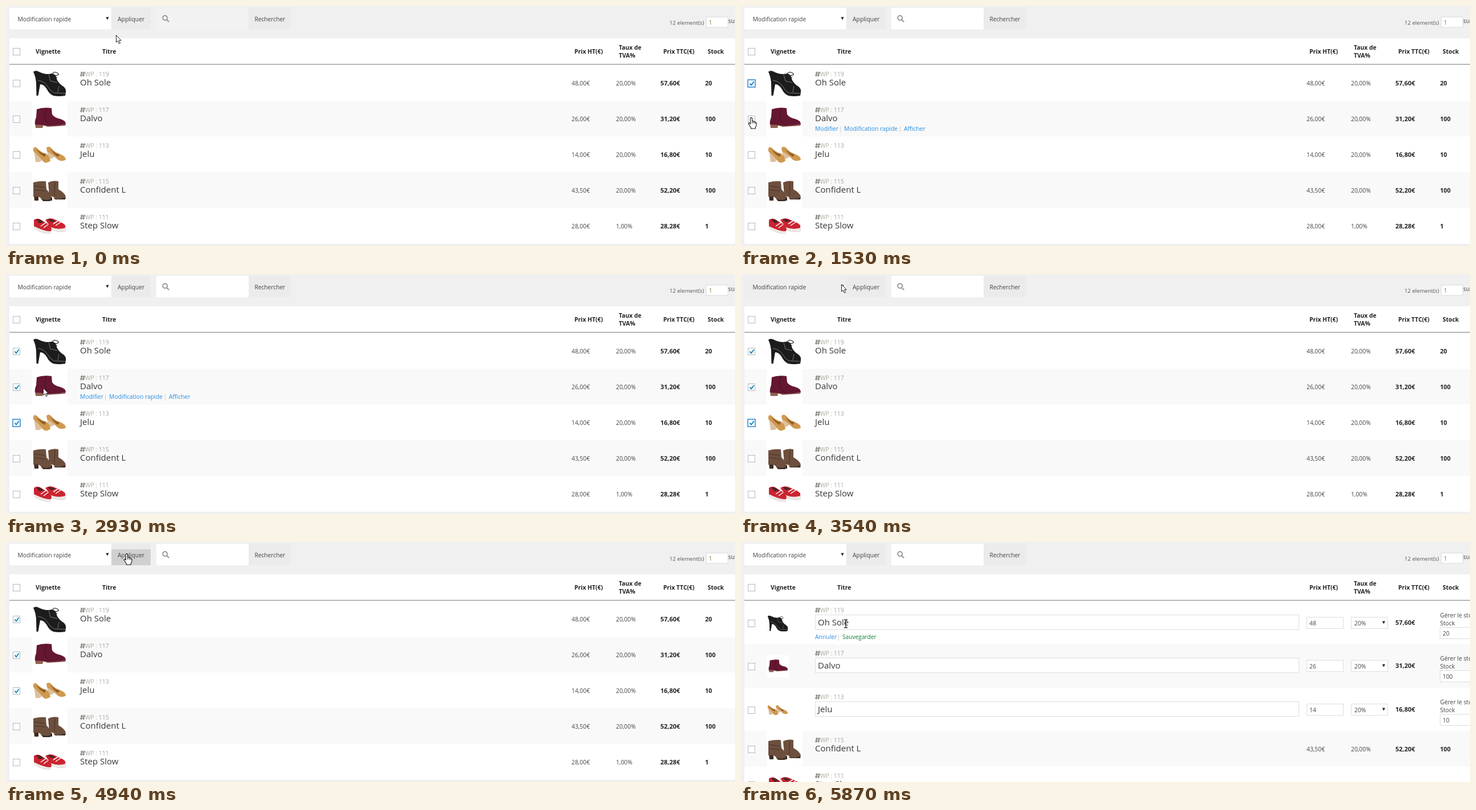
An HTML page that plays this animation: 1280x423 px, repeating every 6.42 s.

```html
<!DOCTYPE html>
<html lang="fr">
<head>
<meta charset="utf-8">
<title>Modification rapide</title>
<style>
  html, body { margin: 0; width: 100%; height: 100%; overflow: hidden; background: #f0f0f0; }
  svg { display: block; }
  text { font-family: "Open Sans", "Noto Sans", sans-serif; white-space: pre; }
</style>
</head>
<body>
<svg id="stage" width="1280" height="423" viewBox="0 0 1280 423">
  <defs>
    <g id="shoe0">
      <path fill="#1c1c1c" d="M3 12Q6 9 11 11Q20 16 29 16L37 15L42 18L45 27Q49 34 56 38Q61 42 60 48L59 54Q48 56 38 54Q31 51 27 43Q22 34 15 34L11.5 54H8.5L8 34Q8 23 3 12Z"/>
      <path fill="none" stroke="#777" d="M11 27Q22 28 29 39Q33 46 39 49L59 50M30 17L33 28L45 31M48 37L46 48"/>
      <path fill="none" stroke="#222" stroke-width="1.2" d="M36 17Q38 10 45 14T38 19M37 21L45 22"/>
    </g>
    <g id="shoe1">
      <path fill="#8f6252" d="M6 40L21 42L19 48H7ZM20 43L60 41L59 44L28 46Z"/>
      <path fill="#651631" d="M9 15Q20 11 35 13L36 24Q40 30 50 32Q60 35 60 41Q44 45 28 44Q15 42 6 42Q5 36 8 29Z"/>
      <path fill="none" stroke="#44102a" d="M25 13Q22 26 24 34Q30 41 32 43"/>
    </g>
    <g id="shoe2">
      <path fill="#dcc0a0" d="M4 23L7 45H14L25 37ZM27 25L29 39H35L43 34Z"/>
      <path fill="#d0994f" d="M3 21Q5 17 9 20Q16 28 25 30Q32 34 33 43Q27 48 21 45Q13 34 3 26ZM26 20Q30 16 34 20Q40 28 50 31Q60 35 60 41Q53 45 46 41Q38 32 27 26Z"/>
      <path fill="#8f5f2c" d="M8 21Q16 30 25 31L23 36Q13 31 8 21ZM33 21Q39 29 49 32L46 36Q37 30 33 21Z"/>
    </g>
    <g id="shoe3">
      <path fill="#3f2c22" d="M4 41L12 43V50H5ZM31 42L36 44V50H31ZM16 46L35 48L32 51H20ZM38 46L60 44L59 48H42Z"/>
      <path fill="#6d4f3d" d="M3 18Q13 15 25 16L26 30Q34 38 34 46Q30 50 20 48L12 43H3ZM29 18Q37 14 47 16L47 30Q58 36 60 43Q54 48 43 47L37 43L31 42Z"/>
      <path fill="none" stroke="#49342a" d="M5 24L23 27M5 31L24 33M41 17L40 41"/>
    </g>
    <g id="shoe4">
      <path fill="#efe9e6" stroke="#ccc" stroke-width=".6" d="M4 31L30 41Q36 44 33 45Q20 46 6 37ZM30 31L58 34Q62 40 57 42Q46 43 34 38Z"/>
      <path fill="#cb2430" d="M4 21Q11 16 18 22L30 29Q37 36 34 41Q24 42 4 32ZM24 21Q32 16 40 20L51 25Q61 29 59 35Q47 39 34 34Z"/>
      <path fill="#4c2529" d="M8 21Q14 18 21 25L14 27ZM28 20Q34 18 42 23L34 25Z"/>
      <path fill="none" stroke="#fff" stroke-width="1.5" d="M16 32L25 26M21 35L29 29M38 28L46 23M42 31L51 25"/>
    </g>
    <g id="hash" fill="none" stroke="#85857c" stroke-width="1.5">
      <path d="M3.4 0L1.8 9M7.2 0L5.6 9M.8 2.8H9M0 6.2H8.2"/>
    </g>
    <path id="down" d="M-2.6 -2.5H2.6L0 2.5Z" fill="#222"/>
  </defs>
  <g id="base"></g>
  <g id="list"></g>
  <g id="edit"></g>
  <circle id="halo" r="9.5" fill="#fbf046" fill-opacity=".8"/>
  <g id="cursor" stroke-linejoin="round">
    <path id="arrow" fill="#fff" stroke="#222" d="M.5 .5V13L3.3 10.5L5.4 15.3L7.6 14.3L5.5 9.7H9.2Z"/>
    <g id="hand">
      <path fill="#fff" stroke="#111" stroke-width="1.1" d="M-1.6 11V1.3Q-1.6 -.4 0 -.4T1.6 1.3V6Q4 5.2 4.4 6.8Q6.4 6.2 7 7.8Q9 7.8 9 9.6V13Q8.6 15.6 7.2 17V19H-.6V17Q-3 14 -4.8 10.8Q-5 8.6 -3.2 9Z"/>
      <path fill="none" stroke="#111" stroke-width=".9" d="M1.6 6V10M4.4 6.8V10.2M7 7.8V10.6"/>
    </g>
    <path id="beam" fill="none" stroke="#222" stroke-width="1.3" d="M-3 -7H-1L0 -6L1 -7H3M0 -6V6M-3 7H-1L0 6L1 7H3"/>
  </g>
</svg>
<script>
const LOOP = 6420, EDIT_AT = 5180;
const $ = id => document.getElementById(id);
const BLUE = '#2a8de0', INK = '#444';

const items = [
  ['119', 'Oh Sole', '48,00€', '20,00%', '57,60€', '20'],
  ['117', 'Dalvo', '26,00€', '20,00%', '31,20€', '100'],
  ['113', 'Jelu', '14,00€', '20,00%', '16,80€', '10'],
  ['115', 'Confident L', '43,50€', '20,00%', '52,20€', '100'],
  ['111', 'Step Slow', '28,00€', '1,00%', '28,28€', '1']
];

const rect = (x, y, w, h, fill, extra = '') =>
  `<rect x="${x}" y="${y}" width="${w}" height="${h}" fill="${fill}" ${extra}/>`;
// y is the middle of the capitals
const text = (x, y, s, size = 10.35, fill = INK, weight = 400) =>
  `<text x="${x}" y="${(y + size * .36).toFixed(1)}" font-size="${size}" fill="${fill}" font-weight="${weight}">${s}</text>`;
const bold = (x, y, s, size = 10.4) => text(x, y, s, size, '#222', 700);
const field = (x, y, w, h) => rect(x + .5, y + .5, w - 1, h - 1, '#fff', 'stroke="#ddd"');
const box = y => rect(12.5, y - 6, 12, 12, '#fff', 'stroke="#b4b9be"');
const use = (id, x, y, scale = 1) =>
  `<use href="#${id}" transform="translate(${x} ${y}) scale(${scale})"/>`;
const thumb = (i, x, y, scale = 1) => rect(x, y, 63 * scale, 63 * scale, '#fff') + use('shoe' + i, x, y, scale);
const label = (y, id) => use('hash', 130, y - 4.5) + text(139, y, 'WP : ' + id, 10.6, '#77776e', 300);
const bar = (x, y) => text(x, y, '|', 10, '#bbb');

function baseView() {
  const heads = [[52, 'Vignette'], [169, 'Titre'], [998, 'Prix HT(€)'], [1154, 'Prix TTC(€)'], [1232, 'Stock']];
  return rect(0, 0, 1280, 423, '#f0f0f0')
    + rect(6, 3, 179, 38, '#fff', 'id="select"') + text(20.5, 23, 'Modification rapide')
    + use('down', 178, 22)
    + rect(185, 3, 69, 38, '#ebebeb') + rect(185, 13, 69, 28, '#d0d0d0', 'id="press"')
    + text(196, 23, 'Appliquer')
    + rect(264, 3, 162, 38, '#fff', 'id="search"')
    + '<path d="M282.5 24.5L286.2 28" stroke="#999" stroke-width="2.4"/><circle cx="279.2" cy="21" r="4" fill="none" stroke="#999" stroke-width="2"/>'
    + rect(426, 3, 74, 38, '#ebebeb') + text(436.5, 23, 'Rechercher', 10.2)
    + text(1165, 29.5, '12 element(s)', 9.6, '#555')
    + field(1229, 19, 39, 19) + text(1234, 29.5, '1', 10, '#86703a')
    + text(1268, 26.5, 'sur')
    + rect(6, 57, 1274, 362, '#fff') + box(80.5)
    + heads.map(h => bold(h[0], 80, h[1])).join('')
    + bold(1076, 73, 'Taux de') + bold(1076, 87, 'TVA%')
    + rect(6, 102, 1274, 1.4, '#959a95')
    + rect(6.5, 41.5, 178, 17, '#1e90ff', 'class="menu" stroke="#7f9db9"')
    + `<g class="menu">${text(21, 50, 'Modification rapide', 10.35, '#fff')}</g>`;
}

function plainRow(i, top) {
  const [id, name, ht, vat, ttc, stock] = items[i];
  return rect(6, top, 1274, 63, i % 2 ? '#f9f9f9' : '#fff') + thumb(i, 45, top)
    + box(top + 32.5) + label(top + 16, id) + text(130, top + 31, name, 15, '#383838')
    + text(993, top + 32, ht) + text(1071, top + 32, vat)
    + bold(1149, top + 32, ttc, 11) + bold(1227.5, top + 32, stock, 10.7);
}

function listView() {
  return items.map((_, i) => {
    const top = 104 + 63 * i, y = top + 49;
    const links = text(130, y, 'Modifier', 10.4, BLUE) + bar(172, y)
      + text(181, y, 'Modification rapide', 10.4, BLUE) + bar(277, y) + text(286, y, 'Afficher', 10.4, BLUE);
    const c = top + 32.5;
    return plainRow(i, top) + `<g class="links">${links}</g>`
      + rect(12, c - 6.5, 13, 13, 'none', 'class="ring" stroke="#4f9fdc" stroke-width="1.8"')
      + `<path class="tick" d="M15.5 ${c}L18 ${c + 3}L22.7 ${c - 3.4}" fill="none" stroke="#1e8cbe" stroke-width="2"/>`;
  }).join('');
}

function editRow(i) {
  const top = Math.round(104 + 76.4 * i), [id, name, ht, , ttc, stock] = items[i];
  return rect(6, top, 1274, 77, i % 2 ? '#f9f9f9' : '#fff') + thumb(i, 45, top + 19.5, .62)
    + box(top + 39.5) + label(top + 16, id)
    + field(130, top + 24, 850, 27) + text(135, top + 38, name, 15, '#383838')
    + field(993, top + 28, 65, 21) + text(998, top + 39, parseInt(ht))
    + field(1071, top + 28, 65, 21) + text(1077, top + 39, '20%') + use('down', 1128.5, top + 38)
    + bold(1149, top + 38, ttc, 11)
    + text(1227.5, top + 25, 'Gérer le stock') + text(1227.5, top + 39, 'Stock')
    + field(1227, top + 46, 70, 21) + text(1232, top + 57, stock);
}

function editView() {
  return [0, 1, 2].map(editRow).join('')
    + `<g id="save">${text(130, 167, 'Annuler', 10.4, BLUE)}${bar(169, 167)}${text(178, 167, 'Sauvegarder', 10.2, '#12803a')}</g>`
    + plainRow(3, 333) + plainRow(4, 396);
}

$('base').innerHTML = baseView();
$('list').innerHTML = listView();
$('edit').innerHTML = editView();
const all = s => [...document.querySelectorAll(s)];
const links = all('.links'), ticks = all('.tick'), rings = all('.ring'), menu = all('.menu');

// first step, last step, number of steps, end point
const moves = [
  [70, 670, 9, 12, 134],
  [890, 1530, 9, 18, 197],
  [1750, 2160, 6, 19, 263],
  [2770, 3410, 9, 196, 22],
  [3480, 3540, 2, 176, 18],
  [3620, 4020, 6, 166, 23],
  [4090, 4090, 1, 162, 25],
  [4160, 4310, 3, 131, 49],
  [4490, 4940, 7, 212, 21],
  [5550, 5870, 5, 184, 144]
];
const halos = [[670, 890], [1590, 1670], [4020, 4090], [4310, 4490]];
const focus = [[890, 1670], [1670, 2600], [2600, 4090]];

function pointer(t) {
  let x = 193, y = 51;
  for (const [from, to, n, px, py] of moves) {
    if (t < from) break;
    const gap = (to - from) / (n - 1) || 1;
    const f = Math.min(n, Math.floor((t - from) / gap + 1e-6) + 1) / n;
    const e = f * f * (3 - 2 * f);
    x += (px - x) * e;
    y += (py - y) * e;
  }
  return [x, y];
}

const show = (el, on) => { el.style.display = on ? '' : 'none'; };
const within = (t, [a, b]) => t >= a && t < b;

function draw(t) {
  const [x, y] = pointer(t), editing = t >= EDIT_AT;
  const row = Math.floor((y - 104) / 63);
  const onButton = x >= 185 && x < 254 && y > 3 && y < 41;
  const onBox = !editing && x < 27 && row >= 0 && Math.abs(y - 136.5 - 63 * row) < 9;
  const onField = editing && y >= 128 && y < 154;
  const open = within(t, [4020, 4490]);

  show($('list'), !editing);
  show($('edit'), editing);
  show($('save'), y >= 104);
  links.forEach((el, i) => show(el, i === row));
  ticks.forEach((el, i) => show(el, i < focus.length && t >= focus[i][0]));
  rings.forEach((el, i) => show(el, i < focus.length && within(t, focus[i])));
  menu.forEach(el => show(el, open));
  show($('press'), onButton);
  $('select').setAttribute('fill', open || (x < 185 && y < 41) ? '#eee' : '#fff');
  $('search').setAttribute('fill', t < 70 ? '#f2f2f2' : '#fff');

  const at = `translate(${x.toFixed(1)} ${y.toFixed(1)})`;
  $('cursor').setAttribute('transform', at);
  $('halo').setAttribute('transform', at);
  show($('halo'), halos.some(h => within(t, h)));
  show($('hand'), onButton || onBox);
  show($('beam'), onField);
  show($('arrow'), !onButton && !onBox && !onField);
}

const start = performance.now();
function tick(now) {
  draw(Math.max(0, now - start) % LOOP);
  requestAnimationFrame(tick);
}
draw(0);
requestAnimationFrame(tick);
</script>
</body>
</html>
```
